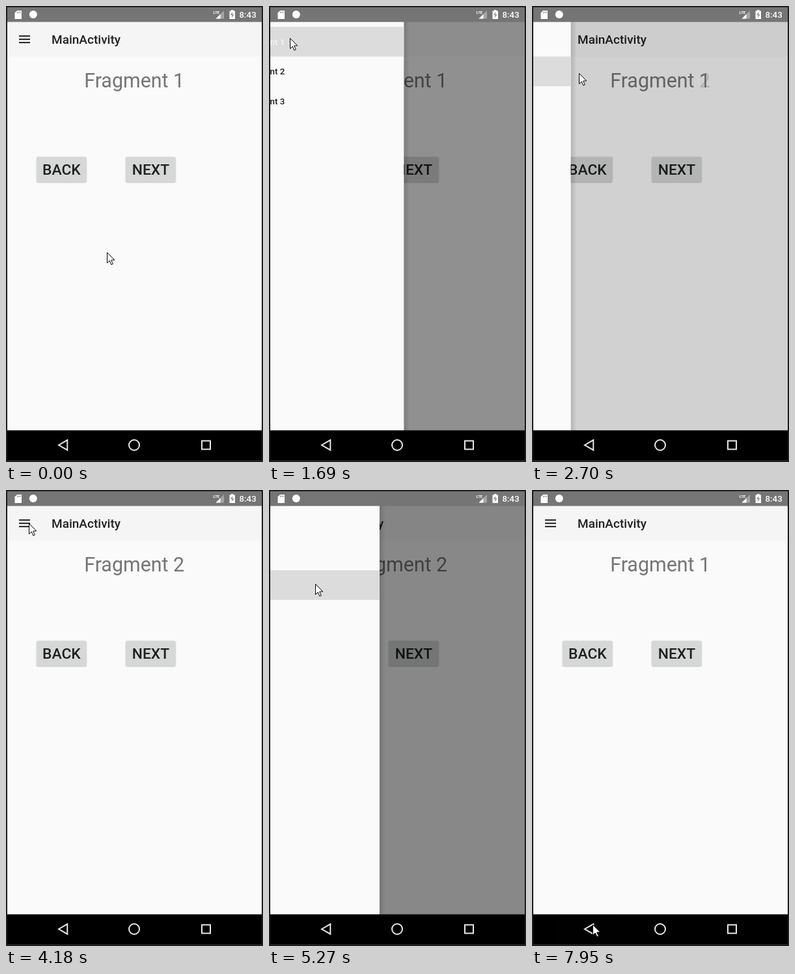
These frames come from a looping animation (395 by 700 pixels, 8000 ms). An HTML page with a canvas:

```html
<!DOCTYPE html>
<html lang="en">
<head>
<meta charset="utf-8">
<title>Navigation drawer</title>
<style>
html, body { margin: 0; width: 100%; height: 100%; overflow: hidden; background: #1f1f21; }
canvas { display: block; }
</style>
</head>
<body>
<canvas id="stage" width="395" height="700"></canvas>
<script>
const c = document.getElementById('stage').getContext('2d');
const LOOP = 8000, DRAWER = 266, SLIDE = 512, FADE = 220;
const LEFT = 2, TOP = 24.5, WIDTH = 391, BOTTOM = 651.4, ROW = 45.6;
const BAR = '#757575', INK = '#1f1f1f', PAPER = '#fafafa';

const visits = [
  { open: 1560, press: 2390, close: 2566, row: 1 },
  { open: 4330, press: 5120, close: 5226, row: 2 }
];
const backPress = 7440, backRelease = 7520;

// Page shown from each moment on
const pages = [
  { at: -LOOP, page: 1 },
  ...visits.map(v => ({ at: v.close + 75, page: v.row + 1 })),
  { at: backRelease + 20, page: 1 }
];

// Pointer moves; bow bends the way sideways
const moves = [
  { from: 690, to: 1290, x: 22, y: 38 },
  { from: 1290, to: 1430, x: 32, y: 49 },
  { from: 1900, to: 2190, x: 72, y: 103 },
  { from: 3490, to: 4150, x: 35, y: 51 },
  { from: 4540, to: 4890, x: 71, y: 144 },
  { from: 6060, to: 6830, x: 96, y: 656, bow: 23 },
  { from: 6880, to: 6980, x: 96, y: 664 },
  { from: 7160, to: 7210, x: 93, y: 667 }
];

const clamp = v => Math.max(0, Math.min(1, v));
const settle = u => 1 - (1 - clamp(u)) ** 5;
const smooth = u => u * u * (3 - 2 * u);

function rect(x, y, w, h, color) {
  c.fillStyle = color;
  c.fillRect(x, y, w, h);
}
function text(s, x, y, size, color, weight = 500, align = 'left') {
  c.font = `${weight} ${size}px Roboto, sans-serif`;
  c.textAlign = align;
  c.fillStyle = color;
  c.fillText(s, x, y);
}
function poly(points, fill, stroke, width = 1) {
  c.beginPath();
  points.forEach(([x, y]) => c.lineTo(x, y));
  c.closePath();
  if (fill) { c.fillStyle = fill; c.fill(); }
  if (stroke) { c.strokeStyle = stroke; c.lineWidth = width; c.stroke(); }
}
function disc(x, y, r, color) {
  c.beginPath();
  c.arc(x, y, r, 0, 7);
  c.fillStyle = color;
  c.fill();
}
function clipped(x, y, w, h, draw) {
  c.save();
  c.beginPath();
  c.rect(x, y, w, h);
  c.clip();
  draw();
  c.restore();
}

function drawerAt(t) {
  const v = visits.findLast(v => t >= v.open);
  return v ? settle((t - v.open) / SLIDE) * (1 - settle((t - v.close) / SLIDE)) : 0;
}

function pointerAt(t) {
  let x = 155, y = 378;
  for (const m of moves) {
    const p = smooth(clamp((t - m.from) / (m.to - m.from)));
    const bend = (m.bow || 0) * (Math.sin(2 * Math.PI * p) + Math.sin(Math.PI * p) / 2);
    x += (m.x - x) * p + bend;
    y += (m.y - y) * p;
  }
  return [x, y];
}

function statusBar() {
  rect(LEFT, 2, WIDTH, TOP - 2, BAR);
  poly([[17, 7], [24, 7], [24, 20], [13.5, 20], [13.5, 10.5]], '#fff');
  for (let i = 0; i < 3; i++) rect(17 + i * 2.3, 8.5, 1, 2.5, BAR);
  disc(41.8, 13, 6, '#fff');
  text('LTE', 318.5, 12, 6, '#fff', 700);
  poly([[335, 7], [335, 19.5], [322.5, 19.5]], '#a5a5a5');
  poly([[329.5, 12.5], [329.5, 19.5], [322.5, 19.5]], '#fff');
  rect(343.5, 7.5, 8.5, 12.5, '#fff');
  rect(346, 6, 3.5, 2, '#fff');
  poly([[348.5, 9], [345, 14.3], [350.5, 12.8], [347, 18.3]], BAR);
  text('8:43', 358.5, 18, 13.3, '#fff');
}

function button(label, x) {
  c.save();
  c.shadowColor = 'rgba(0,0,0,.25)';
  c.shadowBlur = 2;
  c.shadowOffsetY = 1;
  c.beginPath();
  c.roundRect(x, 231.5, 76.5, 38.5, 2);
  c.fillStyle = '#d6d7d7';
  c.fill();
  c.restore();
  text(label, x + 38.4, 259, 22.8, INK, 500, 'center');
}

function heading(t) {
  const word = 'Fragment ', x = 120.2, y = 125;
  const write = (s, x) => text(s, x, y, 30.43, BAR, 400);
  write(word, x);
  const digitX = x + c.measureText(word).width;
  const i = pages.findLastIndex(p => t >= p.at);
  const p = clamp((t - pages[i].at) / FADE);
  c.globalAlpha = 1 - p * p;
  if (i > 0) write(pages[i - 1].page, digitX);
  c.globalAlpha = p;
  write(pages[i].page, digitX);
  c.globalAlpha = 1;
}

function content(t) {
  rect(LEFT, 24, WIDTH, 628, PAPER);
  rect(LEFT, 24, WIDTH, 53.5, '#f5f5f5');
  for (let i = 0; i < 3; i++) rect(20, 45.2 + i * 5, 17, 1.9, '#1a1a1a');
  text('MainActivity', 70, 58, 19, '#212121');
  heading(t);
  button('BACK', 47);
  button('NEXT', 184);
}

function drawer(t) {
  const open = drawerAt(t);
  // The scrim trails the panel by one screen refresh
  rect(LEFT, 24, WIDTH, 628, `rgba(0,0,0,${0.6 * drawerAt(t - 18)})`);
  if (open < 0.002) return;
  const edge = LEFT + DRAWER * open, left = edge - DRAWER;
  const shade = c.createLinearGradient(edge, 0, edge + 9, 0);
  shade.addColorStop(0, 'rgba(0,0,0,.14)');
  shade.addColorStop(1, 'rgba(0,0,0,0)');
  rect(edge, 24, 9, 628, shade);
  rect(left, 24, DRAWER, 628, PAPER);

  const chosen = visits.findLast(v => t >= v.close)?.row ?? 0;
  for (let i = 0; i < 3; i++) {
    const y = 32 + i * ROW, on = i === chosen;
    if (on) rect(left, y, DRAWER, ROW, '#dcdcdc');
    text(`Fragment ${i + 1}`, left + 15.2, y + 27.6, 13.3, on ? '#f5f5f5' : INK);
  }

  const v = visits.findLast(v => t >= v.press);
  if (v && t < v.close) {
    const [x, y] = pointerAt(t);
    clipped(left, 32 + v.row * ROW, DRAWER, ROW, () =>
      disc(x, y, 20 + (t - v.press) * 0.9, 'rgba(0,0,0,.1)'));
  }
}

function navBar(t) {
  const y = 674;
  rect(LEFT, BOTTOM, WIDTH, 697 - BOTTOM, '#000');
  if (t > backPress) {
    const r = 51 * settle((t - backPress) / 350);
    const glow = 0.2 * (1 - clamp((t - backRelease) / 440));
    clipped(LEFT, BOTTOM, WIDTH, 697 - BOTTOM, () => disc(87, y, r, `rgba(255,255,255,${glow})`));
  }
  poly([[81, y], [94.3, y - 7.7], [94.3, y + 7.7]], null, '#e8e8e8', 2);
  c.beginPath();
  c.arc(197, y, 8, 0, 7);
  c.stroke();
  c.strokeRect(301, y - 6.5, 13, 13);
}

function pointer(t) {
  const [x, y] = pointerAt(t);
  c.save();
  c.translate(x + 0.5, y + 0.5);
  poly([[0, 0], [0, 16], [3.7, 12.5], [6.4, 18.5], [8.8, 17.4], [6.2, 11.6], [11.3, 11.4]], '#fff', '#000');
  c.restore();
}

function frame(now) {
  const t = now % LOOP;
  rect(0, 0, 395, 700, '#1f1f21');
  clipped(LEFT, 24, WIDTH, 628, () => {
    content(t);
    drawer(t);
  });
  statusBar();
  navBar(t);
  pointer(t);
  requestAnimationFrame(frame);
}
requestAnimationFrame(frame);
</script>
</body>
</html>
```
